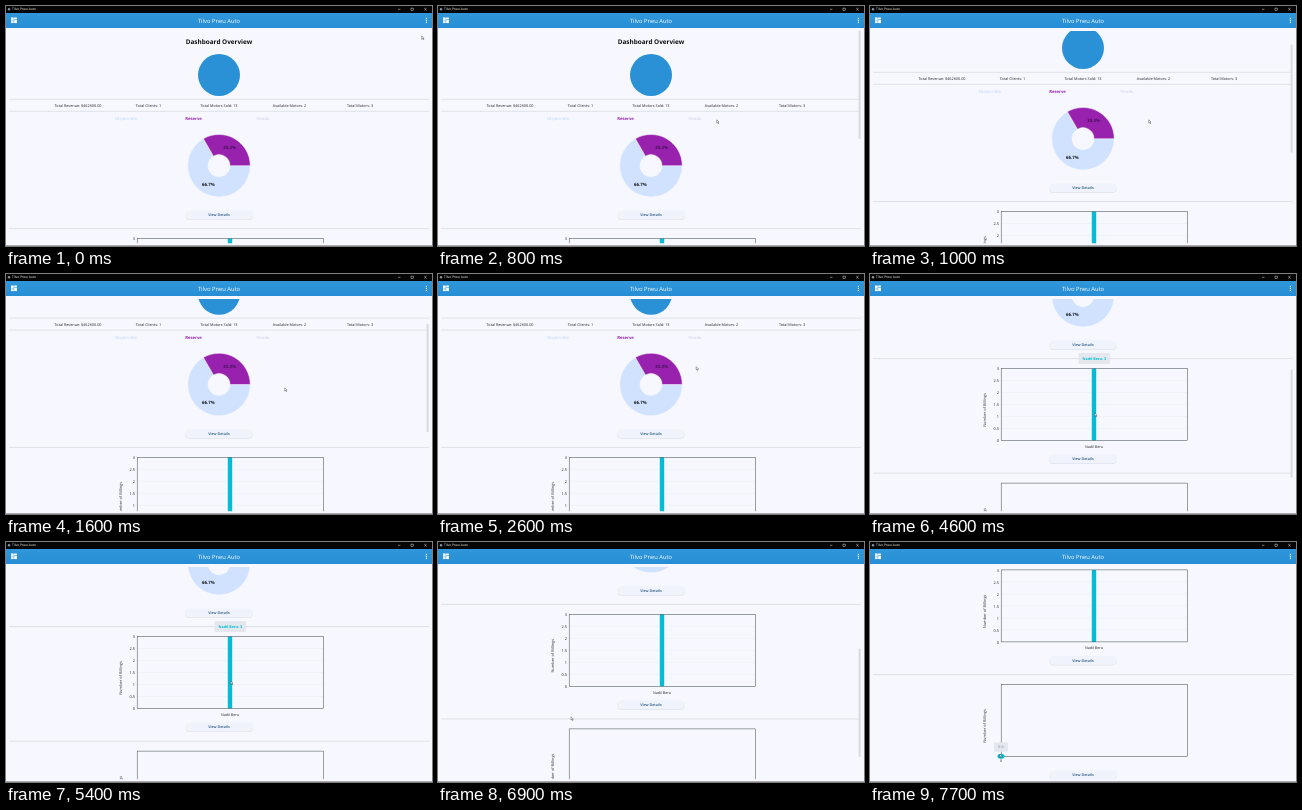
An HTML page that plays this animation: 426 by 240 pixels, repeating every 8000 ms.

```html
<!DOCTYPE html>
<html lang="en">
<head>
<meta charset="utf-8">
<title>Dashboard</title>
<style>
  html, body { margin: 0; width: 100%; height: 100%; overflow: hidden; background: #f7f8ff; }
  svg { display: block; width: 426px; height: 240px; }
  text { font-family: "Open Sans", "Noto Sans", sans-serif; text-rendering: geometricPrecision; }
</style>
</head>
<body>
<svg viewBox="0 0 426 240">
  <defs>
    <linearGradient id="blue" x2="0" y2="1">
      <stop offset="0" stop-color="#3197db"/>
      <stop offset="1" stop-color="#268ed5"/>
    </linearGradient>
    <clipPath id="view"><rect x="3" y="25" width="420" height="212.3"/></clipPath>
  </defs>
  <rect width="426" height="240" fill="#f7f8ff"/>
  <g clip-path="url(#view)"><g id="page"></g></g>
  <rect id="thumb" x="420.6" width="2" height="108" fill="#d9dae1"/>
  <g id="chrome"></g>
  <path id="cursor" d="M0 0V3.3L.8 2.6L1.4 3.9L1.9 3.6L1.4 2.4H2.4Z" fill="#fff" stroke="#333" stroke-width=".4"/>
</svg>
<script>
const LOOP = 8000, TICK = 100;
const BRAND = 'Tilvo Pneu Auto', CLIENT = 'Nadil Beru';
const CYAN = '#00bcd4', PALE = '#d0e2ff', PURPLE = '#9822ae';
const PIE = { x: 213, y: 159.7, r: 31.2, hole: 11 };
const CHART = { x: 131.2, w: 186.2, h: 72, top: 232.5, gap: 114.6 };
const BAR = { x: 224, w: 4.4 };
const DOT = { x: 131, y: CHART.top + CHART.gap + CHART.h };
const $ = id => document.getElementById(id);
const page = $('page'), chrome = $('chrome');

function add(parent, tag, attrs, content = '') {
  const el = document.createElementNS('http://www.w3.org/2000/svg', tag);
  for (const key in attrs) el.setAttribute(key, attrs[key]);
  el.textContent = content;
  return parent.appendChild(el);
}
const rect = (p, x, y, width, height, fill, more) =>
  add(p, 'rect', { x, y, width, height, fill, ...more });
const circle = (p, cx, cy, r, fill) => add(p, 'circle', { cx, cy, r, fill });
const line = (p, d, stroke, width) =>
  add(p, 'path', { d, stroke, 'stroke-width': width, fill: 'none' });
// y is the vertical middle of the text
const label = (p, str, x, y, size, fill = '#222', weight = 400, anchor = 'middle', more) =>
  add(p, 'text', { x, y: y + size * 0.36, 'font-size': size, fill, 'font-weight': weight,
    'text-anchor': anchor, ...more }, str);

const divider = y => line(page, `M3 ${y}H423`, '#cfd0d9', 0.6);

function button(y) {
  rect(page, 179, y - 3.8, 68, 8.8, '#e0e2ea', { rx: 4.4 });
  rect(page, 179, y - 4.5, 68, 8.8, '#f0f3fb', { rx: 4.4 });
  label(page, 'View Details', 213, y, 3.7, '#24557f', 600);
}

// Divider, frame, axis title and button shared by both charts
function chartBlock(top) {
  divider(top - 9.9);
  rect(page, CHART.x, top, CHART.w, CHART.h, 'none', { stroke: '#37434d', 'stroke-width': 0.5 });
  const y = top + 41.5;
  label(page, 'Number of Billings', 115, y, 3.9, '#333', 400, 'middle',
    { transform: `rotate(-90 115 ${y})` });
  button(top + 90.5);
}

function tooltip(str, x, y, w, h, fill) {
  const g = add(page, 'g', {});
  rect(g, x - w / 2, y - h / 2, w, h, '#e4e7ee', { rx: 1 });
  label(g, str, x, y, 3.7, fill, 700);
  return g;
}

function slicePath(from, to, r) {
  const at = (deg, rad) => {
    const a = deg * Math.PI / 180;
    return `${PIE.x + rad * Math.cos(a)} ${PIE.y + rad * Math.sin(a)}`;
  };
  const big = to - from > 180 ? 1 : 0;
  return `M${at(from, r)}A${r} ${r} 0 ${big} 1 ${at(to, r)}` +
    `L${at(to, PIE.hole)}A${PIE.hole} ${PIE.hole} 0 ${big} 0 ${at(from, PIE.hole)}Z`;
}

// Returns a function that grows the slice while the point is over it
function makeSlice(from, to, fill, str, ink) {
  const shape = add(page, 'path', { fill, stroke: '#f7f8ff', 'stroke-width': 0.5 });
  const text = label(page, str, 0, 0, 4.4, ink, 700);
  const mid = (from + to) / 2 * Math.PI / 180;
  return (x, y) => {
    const dx = x - PIE.x, dy = y - PIE.y, dist = Math.hypot(dx, dy);
    const deg = (Math.atan2(dy, dx) * 180 / Math.PI + 360) % 360;
    const over = dist > PIE.hole && dist < PIE.r && deg >= from && deg < to;
    const r = PIE.r + (over ? 2.5 : 0), size = over ? 4.8 : 4.4;
    const reach = (r + PIE.hole) / 2;
    shape.setAttribute('d', slicePath(from, to, r));
    text.setAttribute('x', PIE.x + reach * Math.cos(mid));
    text.setAttribute('y', PIE.y + reach * Math.sin(mid) + size * 0.36);
    text.setAttribute('font-size', size);
  };
}

// Page content, laid out for scroll position 0
label(page, 'Dashboard Overview', 213, 35.6, 6.4, '#111', 700);
circle(page, 213, 69, 21, '#2a91d6');
divider(93.3);
divider(105.3);
['Total Revenue: $462600.00', 'Total Clients: 1', 'Total Motors Sold: 13',
  'Available Motors: 2', 'Total Motors: 3']
  .forEach((str, i) => label(page, str, 72 + i * 70.5, 99.7, 3.78));
label(page, 'Disponible', 120, 112.5, 4.2, PALE, 700);
label(page, 'Reserve', 187.5, 112.5, 4.2, PURPLE, 700);
label(page, 'Vendu', 257, 112.5, 4.2, '#d9daf0', 700);
const slices = [
  makeSlice(0, 240, PALE, '66.7%', '#111'),
  makeSlice(240, 360, PURPLE, '33.3%', '#45105a'),
];
button(209);

const base = CHART.top + CHART.h;
for (let i = 0; i <= 6; i++) {
  const y = base - i * CHART.h / 6;
  if (i % 6) line(page, `M${CHART.x} ${y}h${CHART.w}`, '#e9ebf5', 0.5);
  label(page, i / 2, 129, y + 0.3, 3.9, '#222', 400, 'end');
}
rect(page, BAR.x - BAR.w / 2, CHART.top, BAR.w, CHART.h, CYAN, { rx: 0.8 });
chartBlock(CHART.top);
label(page, CLIENT, BAR.x, base + 6, 3.7);
const barTip = tooltip(CLIENT + ': 3', BAR.x + 0.3, CHART.top - 9.9, 31.5, 11, CYAN);

chartBlock(CHART.top + CHART.gap);
add(page, 'ellipse', { cx: DOT.x, cy: DOT.y - 0.3, rx: 3.5, ry: 2.5, fill: CYAN });
label(page, '0', DOT.x, DOT.y + 4.1, 3.7);
const dotTip = tooltip('0.0', DOT.x, DOT.y - 9.6, 14, 9.5, '#a3a9b2');

// Window title bar, app bar and bottom edge
rect(chrome, 0, 0, 426, 7, '#050505');
circle(chrome, 3, 3.2, 1.2, '#8b9299');
label(chrome, BRAND, 6, 3.2, 3.3, '#fff', 400, 'start');
line(chrome, 'M392 3.3h2.4M418.2 2l2.4 2.4m0-2.4l-2.4 2.4', '#ddd', 0.5);
rect(chrome, 405, 2.1, 2.2, 2.2, 'none', { stroke: '#ddd', 'stroke-width': 0.5 });
rect(chrome, 0, 7, 426, 15, 'url(#blue)');
for (const [x, y, h] of [[5, 11.5, 3.2], [5, 15.2, 1.9], [8.2, 11.5, 1.9], [8.2, 13.9, 3.2]])
  rect(chrome, x, y, 2.7, h, '#fff');
label(chrome, BRAND, 213, 14.5, 5.8, '#fff');
for (let i = -1; i <= 1; i++) circle(chrome, 420.4, 14.5 + i * 2, 0.65, '#fff');
rect(chrome, 0, 239.4, 426, 0.6, '#777');

// Motion: wheel notches, and pointer legs as [start, end, x, y]
const WHEEL = [900, 1100, 3900, 4100, 4300, 4500, 6900, 7000, 7000];
const LEGS = [[0, 1, 415.7, 30], [100, 800, 278.7, 113.8], [2300, 2600, 258.2, 92.6],
  [2600, 2900, 190, 82], [2900, 3300, 225.5, 135], [4100, 4600, 224.7, 139],
  [6000, 6400, 150, 198], [6400, 6800, 133, 174.8], [7100, 7500, 130, 212]];

const clamp = v => Math.max(0, Math.min(1, v));
const show = (el, on) => el.setAttribute('visibility', on ? 'visible' : 'hidden');

function scrollAt(t) {
  const notches = WHEEL.filter(w => w <= t).length;
  return notches && 4.8 + notches * 22.2;
}

// The thumb appears just before a notch and fades once the wheel rests
const thumbAt = t => Math.max(...WHEEL.map(w => t < w - 100 ? 0 : clamp((w + 700 - t) / 200)));

function pointerAt(t) {
  let [, , x, y] = LEGS[0];
  for (const [from, to, toX, toY] of LEGS) {
    const f = clamp((t - from) / (to - from)), ease = f * f * (3 - 2 * f);
    x += (toX - x) * ease;
    y += (toY - y) * ease;
  }
  return [x, y];
}

function draw(t) {
  const scroll = scrollAt(t), [x, y] = pointerAt(t), pageY = y + scroll;
  page.setAttribute('transform', `translate(0 ${-scroll})`);
  $('thumb').setAttribute('y', 24.8 + scroll * 0.512);
  $('thumb').setAttribute('opacity', thumbAt(t));
  $('cursor').setAttribute('transform', `translate(${x} ${y})`);
  slices.forEach(hover => hover(x, pageY));
  show(barTip, Math.abs(x - BAR.x) < 4 && pageY > CHART.top && pageY < base);
  show(dotTip, Math.hypot(x - DOT.x, pageY - DOT.y) < 4);
}

const start = performance.now();
function frame() {
  const t = (performance.now() - start) % LOOP;
  draw(Math.floor(t / TICK) * TICK);
  requestAnimationFrame(frame);
}
frame();
</script>
</body>
</html>
```
